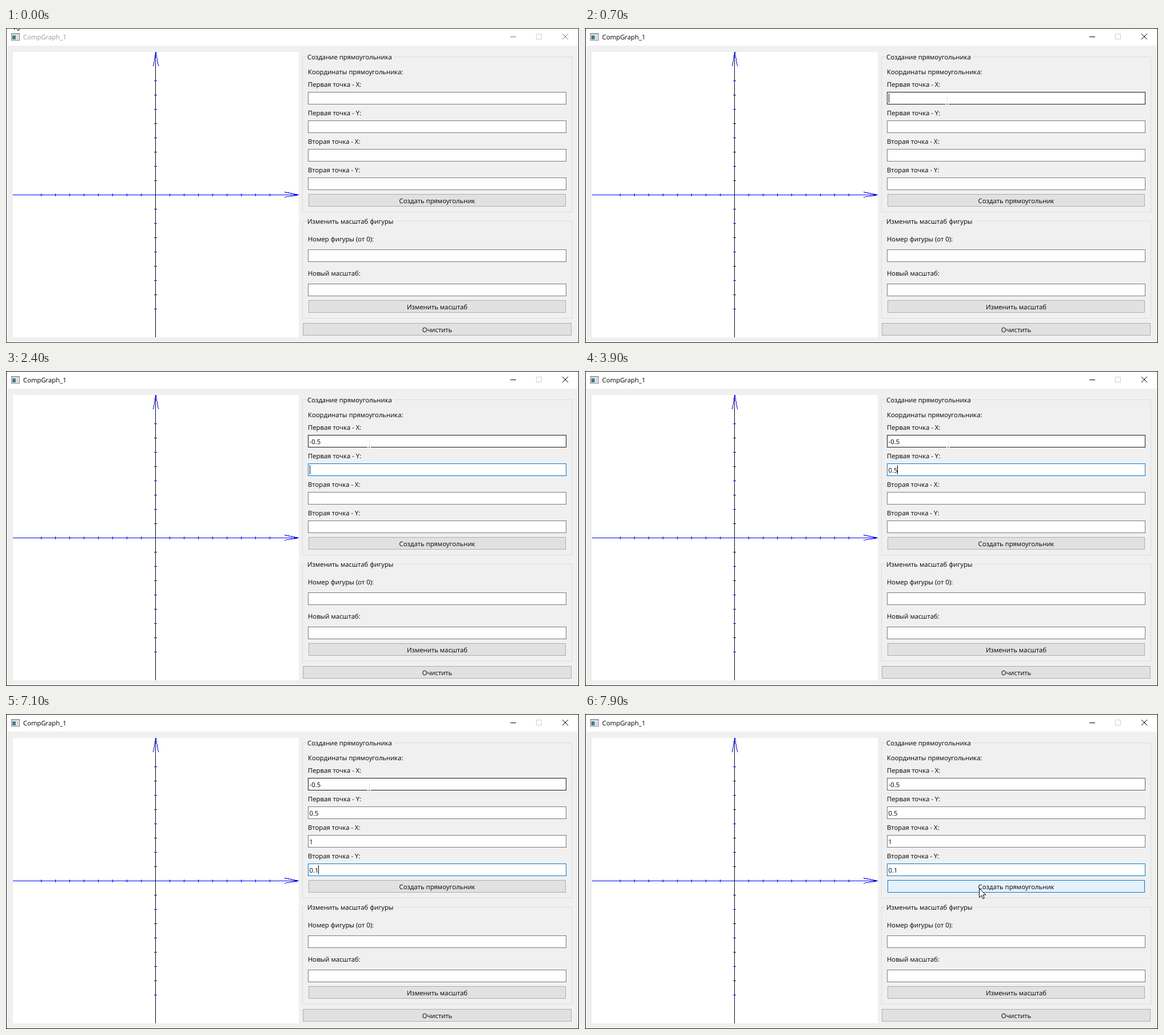
An HTML page that plays this animation: 1002 px wide and 552 px high, repeating every 8000 ms.

```html
<!DOCTYPE html>
<html lang="ru">
<head>
<meta charset="utf-8">
<title>CompGraph_1</title>
<style>
html, body { margin: 0; width: 100%; height: 100%; overflow: hidden; background: #f0f0f0; }
svg { display: block; shape-rendering: crispEdges; }
text { font: 11.3px "Open Sans", "Noto Sans", sans-serif; fill: #000; text-rendering: geometricPrecision; white-space: pre; }
</style>
</head>
<body>
<svg id="stage" width="1002" height="552" viewBox="0 0 1002 552"></svg>
<script>
const LOOP = 8000, STEP = 100, BLINK = 530;
const stage = document.getElementById('stage');

function add(tag, attrs, parent = stage) {
  const el = document.createElementNS('http://www.w3.org/2000/svg', tag);
  set(el, attrs);
  parent.appendChild(el);
  return el;
}
function set(el, attrs) {
  for (const k in attrs) el.setAttribute(k, attrs[k]);
}
const fill = (x, y, width, height, color) => add('rect', { x, y, width, height, fill: color });
const box = (x, y, w, h, color, stroke) =>
  add('rect', { x: x + .5, y: y + .5, width: w - 1, height: h - 1, fill: color, stroke });
const path = (d, stroke, parent) => add('path', { d, stroke, fill: 'none' }, parent);
function label(x, y, str, anchor = 'start') {
  const el = add('text', { x, y, 'text-anchor': anchor });
  el.textContent = str;
  return el;
}
function group(y, h, title, gap) {
  box(518, y, 472, h, 'none', '#dcdcdc');
  fill(525, y - 2, gap, 5, '#f0f0f0');
  label(527, y + 5, title);
}
function button(x, y, w, str) {
  const el = box(x, y, w, 22, '#e1e1e1', '#adadad');
  label(x + w / 2, y + 16, str, 'middle');
  return el;
}
const field = y => box(528, y, 452, 22, '#fff', '#7a7a7a');

// Window frame and title bar
const frame = box(0, 0, 1002, 552, '#f0f0f0', '#333');
fill(1, 1, 1000, 30, '#fff');
box(9, 9, 15, 13, '#f4f4f4', '#808080');
fill(10, 10, 13, 2, '#c4ccd2');
fill(11, 13, 6, 7, '#3d7f8c');
fill(18, 13, 4, 7, '#d4d8da');
const caption = label(30, 20, 'CompGraph_1');
const controls = path('M882 15.5H892', '#777');
const cross = add('path', { d: 'M973 10L983 20M983 10L973 20', fill: 'none', 'shape-rendering': 'auto' });
box(927, 10, 10, 10, 'none', '#d0d0d0');

// Plot area
const BLUE = '#0000f0', DARK = '#101040';
fill(12, 42, 500, 500, '#fff');
path('M261.5 42V542', '#080818');
path('M12 292.5H512', BLUE);
path('M257.5 67L262 42L266.5 67M487 287.5L512 292.5L487 296.5', BLUE);
for (let i = -8; i <= 8; i++) {
  if (!i) continue;
  const p = i * 25;
  path(`M${261.5 + p} 290V295`, BLUE);
  path(`M259 ${292.5 + p}H264`, i % 2 ? DARK : BLUE);
}

// Form
group(50, 273, 'Создание прямоугольника', 153);
label(528, 81, 'Координаты прямоугольника:');
const names = ['Первая точка - X:', 'Первая точка - Y:', 'Вторая точка - X:', 'Вторая точка - Y:'];
const inputs = names.map((name, i) => {
  const y = 112 + i * 50;
  label(528, y - 9, name);
  return { y, frame: field(y), text: label(530.6, y + 16, '') };
});
const create = button(529, 291, 450, 'Создать прямоугольник');
group(338, 171, 'Изменить масштаб фигуры', 157);
label(528, 374, 'Номер фигуры (от 0):');
field(388);
label(528, 434, 'Новый масштаб:');
field(448);
button(529, 477, 450, 'Изменить масштаб');
button(519, 517, 470, 'Очистить');

const caret = fill(531, 115, 1, 16, '#000');
const beam = path('M-3 -5.5H-1M1 -5.5H3M.5 -5V5M-3 5.5H-1M1 5.5H3', '#e6e6e6');
const arrow = add('path', {
  d: 'M.5 .5V16.5L4.3 13L6.8 18.6L9.3 17.5L6.9 12H11.8Z',
  fill: '#fff', stroke: '#000', 'shape-rendering': 'auto'
});

// Time, field, text, caret x
const keys = [
  [570, 0, '', 531], [1400, 0, '-', 536], [1600, 0, '-0', 542], [1700, 0, '-0.', 545], [1900, 0, '-0.5', 551],
  [2400, 1, '', 531], [3500, 1, '0', 537], [3800, 1, '0.', 540], [3900, 1, '0.5', 546],
  [4400, 2, '', 531], [5500, 2, '1', 537],
  [6000, 3, '', 531], [6700, 3, '0', 537], [6900, 3, '0.', 540], [7100, 3, '0.1', 546]
];

const clamp = v => Math.min(1, Math.max(0, v));
const ease = v => v * v * (3 - 2 * v);
const mix = (a, b, u) => a + (b - a) * u;

function pointer(t) {
  const come = ease(clamp(t / 600)), nudge = clamp((t - 700) / 100), go = ease(clamp((t - 7300) / 600));
  return {
    x: Math.round(mix(14, 633, come) + 2 * nudge + 54 * go),
    y: Math.round(mix(-14, 128, come) + 177 * go)
  };
}

function draw(t) {
  const active = t >= 600, tone = active ? '#000' : '#999';
  set(frame, { stroke: active ? '#111' : '#333' });
  set(caption, { style: 'fill:' + tone });
  set(controls, { stroke: active ? '#000' : '#777' });
  set(cross, { stroke: active ? '#000' : '#777' });

  const { x, y } = pointer(t);
  const done = keys.filter(k => k[0] <= t), last = done[done.length - 1];
  let overField = false;
  inputs.forEach((input, i) => {
    const over = x >= 528 && x < 980 && y >= input.y && y < input.y + 22;
    overField = overField || over;
    const typed = done.filter(k => k[1] === i).pop();
    input.text.textContent = typed ? typed[2] : '';
    let edge = '#7a7a7a';
    if (over) edge = '#171717';
    else if (last && last[1] === i) edge = '#0078d7';
    else if (i === 0 && t >= 7400) {
      const g = Math.round(mix(23, 122, clamp((t - 7300) / 800)));
      edge = `rgb(${g},${g},${g})`;
    }
    set(input.frame, { stroke: edge });
  });

  const lit = last && t - last[0] < BLINK;
  set(caret, { visibility: lit ? 'visible' : 'hidden' });
  if (lit) set(caret, { x: last[3], y: inputs[last[1]].y + 3 });

  const hot = x >= 529 && x < 979 && y >= 291 && y < 313;
  set(create, { fill: hot ? '#e5f1fb' : '#e1e1e1', stroke: hot ? '#0078d7' : '#adadad' });

  const transform = `translate(${x} ${y})`;
  set(beam, { transform, visibility: overField ? 'visible' : 'hidden' });
  set(arrow, { transform, visibility: overField ? 'hidden' : 'visible' });
}

const start = performance.now();
function tick() {
  const t = (performance.now() - start) % LOOP;
  draw(Math.floor(t / STEP) * STEP);
  requestAnimationFrame(tick);
}
tick();
</script>
</body>
</html>
```
